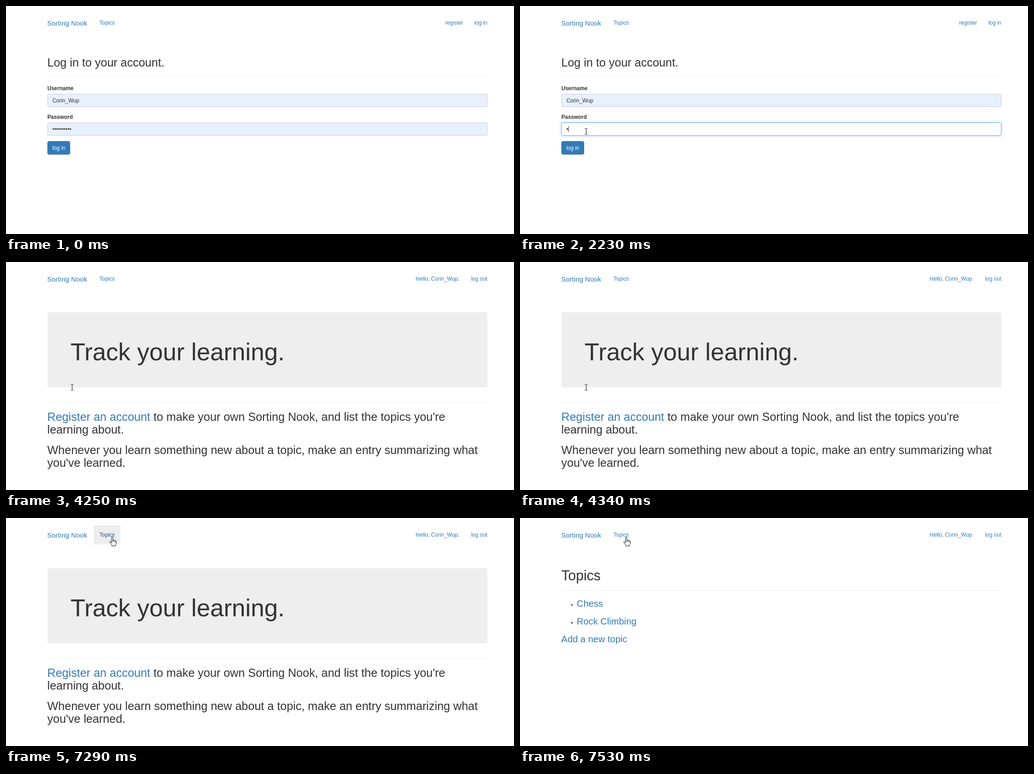
An HTML page for the animation above (8000 ms loop, 1117 px wide and 501 px high).

```html
<!DOCTYPE html>
<html lang="en">
<head>
<meta charset="utf-8">
<title>Login walkthrough</title>
<style>
  html, body { margin: 0; width: 100%; height: 100%; overflow: hidden; background: #fff; }
  svg { display: block; font: 11.88px "Liberation Sans", Arial, sans-serif; fill: #333; }
  .brand { font-size: 15.28px; }
  .h1 { font-size: 30.55px; }
  .h2 { font-size: 25.46px; }
  .h3 { font-size: 20.37px; }
  .hero { font-size: 53.5px; }
  .bold { font-weight: bold; }
  .end { text-anchor: end; }
  .link { fill: #337ab7; }
  .hover { fill: #23527c; }
  .rule, .panel { fill: #eee; }
  .input { fill: #e8f0fe; stroke: #ccc; }
  .input.focus { stroke: #66afe9; filter: drop-shadow(0 0 3px rgba(102, 175, 233, .6)); }
  .input.typed { fill: #fff; }
  .cursor { fill: #fff; stroke: #111; stroke-linejoin: round; }
</style>
</head>
<body>
<svg width="1117" height="501" viewBox="0 0 1117 501">
  <rect id="navHover" class="panel" x="193" y="16" width="59" height="42"/>
  <text class="brand link" x="90.5" y="42.5">Sorting Nook</text>
  <text id="navTopics" class="link" x="205.6" y="41.3">Topics</text>
  <g id="guestNav" class="link end">
    <text x="1005" y="41.3">register</text>
    <text x="1058.3" y="41.3">log in</text>
  </g>
  <g id="userNav" class="link end">
    <text x="997" y="41.3">Hello, Corin_Wup.</text>
    <text x="1058.3" y="41.3">log out</text>
  </g>

  <g id="loginPage">
    <text class="h2" x="90.8" y="132.8">Log in to your account.</text>
    <rect class="rule" x="91" y="154" width="967" height="1"/>
    <text class="bold" x="90.9" y="184.9">Username</text>
    <rect class="input" x="91.5" y="193.5" width="966.5" height="28" rx="3"/>
    <text x="101.9" y="212">Corin_Wup</text>
    <text class="bold" x="90.9" y="247.6">Password</text>
    <rect id="password" class="input" x="91.5" y="256.5" width="966.5" height="28" rx="3"/>
    <rect id="selection" x="102" y="264" width="41.6" height="13" fill="#3390ff"/>
    <text id="dots" x="102" y="275"></text>
    <rect id="caret" y="264" width="1" height="13"/>
    <rect x="91.5" y="297.5" width="49" height="28.5" rx="3" fill="#337ab7" stroke="#2e6da4"/>
    <text x="101.9" y="316.3" fill="#fff">log in</text>
    <g id="suggestions">
      <rect x="91.5" y="286.5" width="966.5" height="99" fill="#fff" stroke="#ddd"/>
      <text x="102" y="310">Corin_Wup</text>
      <text x="102" y="327" fill="#777">••••••••••</text>
      <rect class="rule" x="92" y="343" width="966" height="1"/>
      <text x="102" y="369">Manage passwords...</text>
    </g>
  </g>

  <g id="homePage">
    <rect class="panel" x="91" y="110" width="967.5" height="165.5" rx="5"/>
    <text class="hero" x="141.8" y="215.8">Track your learning.</text>
    <rect class="rule" x="91" y="308.5" width="967" height="1"/>
    <g class="h2">
      <text x="90.8" y="349.3"><tspan class="link">Register an account</tspan> to make your own Sorting Nook, and list the topics you're</text>
      <text x="90.8" y="377.3">learning about.</text>
      <text x="90.8" y="422.3">Whenever you learn something new about a topic, make an entry summarizing what</text>
      <text x="90.8" y="450.3">you've learned.</text>
    </g>
  </g>

  <g id="topicsPage">
    <text class="h1" x="90.8" y="137.4">Topics</text>
    <rect class="rule" x="91" y="159" width="967" height="1"/>
    <circle cx="114" cy="191" r="1.8"/>
    <circle cx="114" cy="230.3" r="1.8"/>
    <g class="h3 link">
      <text x="124.8" y="195.1">Chess</text>
      <text x="124.8" y="234.2">Rock Climbing</text>
      <text x="90.8" y="273.2">Add a new topic</text>
    </g>
  </g>

  <circle id="click" r="10.5" fill="#ff0" fill-opacity=".47"/>
  <g id="cursor" class="cursor">
    <path id="arrow" d="M0 0V14.5L3.4 11.5L5.8 16.5L8 15.5L5.8 10.7H10Z"/>
    <path id="beam" fill="none" d="M-3 -6.5H-1L0 -6L1 -6.5H3M0 -6V6M-3 6.5H-1L0 6L1 6.5H3"/>
    <path id="hand" transform="translate(1.5 0)" d="M-1.8 13V1.7Q-1.8 .2 -.4 .2T1 1.7V7.2Q3.5 6 3.7 8Q6 6.8 6.4 8.8Q8.6 8 8.6 10.2V14.5L6.8 18V20H-1.2V18L-4.8 13Q-7 10 -4.8 9.8Q-3.4 10 -1.8 13ZM1 7V11M3.7 8V11.5M6.4 9V12"/>
  </g>
</svg>
<script>
const LOOP = 8000;
const ui = Object.fromEntries([...document.querySelectorAll('[id]')].map(el => [el.id, el]));
const show = (el, on) => el.style.display = on ? '' : 'none';
const within = (t, from, to) => t >= from && t < to;

// Stepped progress: count positions between the first and last change.
const steps = (t, from, to, count) =>
  Math.min(count, 1 + Math.floor((t - from) / (to - from) * (count - 1) + 1e-6)) / count;
const smooth = p => p * p * (3 - 2 * p);
const bend = (a, b, c, p) => (1 - p) ** 2 * a + 2 * p * (1 - p) * b + p * p * c;

function pointer(t) {
  if (t < 70) return null;
  if (t < 145) return [1022, 484];
  if (t < 220) return [640, 350];
  if (t < 450) return [398.5, 262];
  if (t < 4720) {
    const p = smooth(steps(t, 450, 910, 7));
    return [bend(398.5, 272, 145.5, p), bend(262, 323, 275.5, p)];
  }
  const p = smooth(steps(t, 4720, 5350, 9));
  return [145.5 + 87 * p, 275.5 - 234 * p];
}

function cursorKind(t, x, y) {
  if (t < 4250) return within(t, 3410, 4100) || y < 256 || y > 285 ? 'arrow' : 'beam';
  if (t < 4720) return 'beam';
  if (y < 58 && x > 193) return 'hand';
  return within(y, 170, 228) ? 'beam' : 'arrow';
}

function draw(t) {
  const loggedIn = t >= 4250, onTopics = t >= 7440;
  show(ui.loginPage, !loggedIn);
  show(ui.guestNav, !loggedIn);
  show(ui.userNav, loggedIn);
  show(ui.homePage, loggedIn && !onTopics);
  show(ui.topicsPage, onTopics);

  const typed = [2230, 2410, 2630, 3010].filter(at => t >= at).length;
  const selected = within(t, 1450, 2230);
  const count = typed || 10;
  ui.password.classList.toggle('focus', t >= 1290);
  ui.password.classList.toggle('typed', typed > 0);
  ui.dots.textContent = '•'.repeat(count);
  ui.dots.setAttribute('fill', selected ? '#fff' : '#333');
  ui.caret.setAttribute('x', Math.round(102.3 + count * 4.16));
  show(ui.caret, t >= 1290 && !selected && !within(t, 3550, 4100));
  show(ui.selection, selected);
  show(ui.suggestions, within(t, 1290, 2230));

  const spot = pointer(t);
  show(ui.cursor, spot);
  let kind = '';
  if (spot) {
    kind = cursorKind(t, ...spot);
    const move = `translate(${spot})`;
    ui.cursor.setAttribute('transform', move);
    ui.click.setAttribute('transform', move);
    for (const name of ['arrow', 'beam', 'hand']) show(ui[name], name === kind);
  }
  show(ui.click, within(t, 1290, 1370) || within(t, 1450, 1530) || within(t, 7140, 7290));

  const hover = kind === 'hand' && !onTopics;
  show(ui.navHover, hover);
  ui.navTopics.setAttribute('class', hover ? 'hover' : 'link');
}

function tick() {
  draw(performance.now() % LOOP);
  requestAnimationFrame(tick);
}
tick();
</script>
</body>
</html>
```
